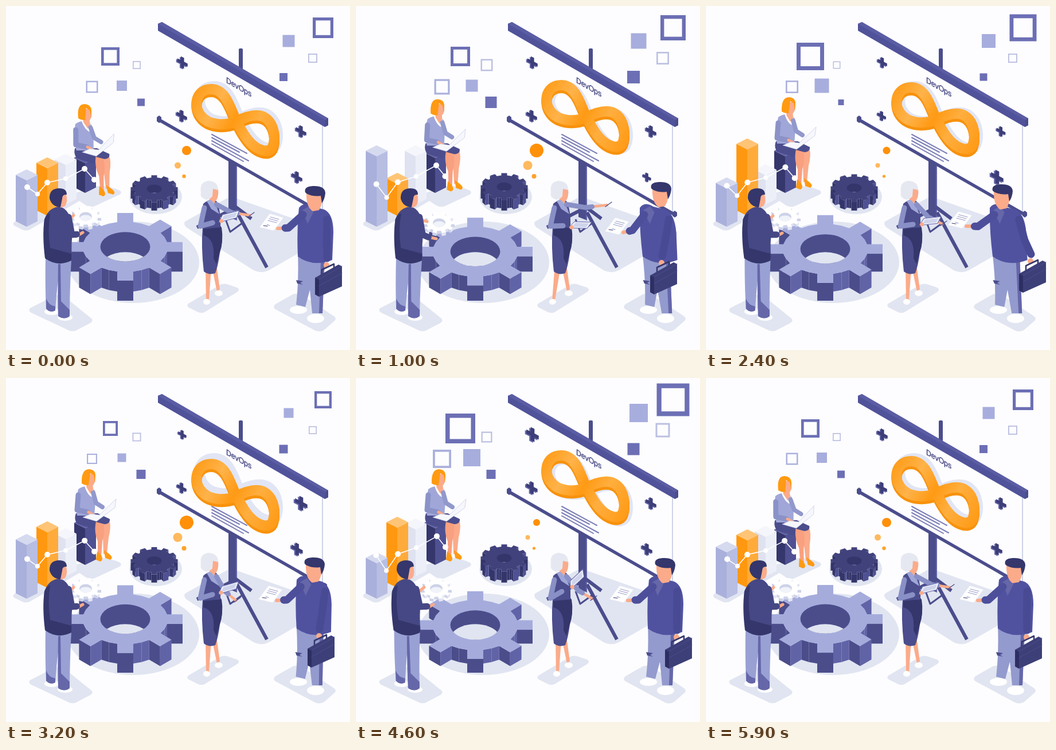
An HTML page for the animation above (6000 ms loop, 600x600 px).

```html
<!DOCTYPE html>
<html lang="en">
<head>
<meta charset="utf-8">
<title>DevOps team</title>
<style>
html, body { margin: 0; width: 100%; height: 100%; overflow: hidden; background: #fdfdff; }
svg { display: block; width: 100vw; height: 100vh; }
.d { fill: #4b4d8c; } .k { fill: #34366c; } .m { fill: #6567a9; } .l { fill: #a0a7d8; }
.g { fill: #e1e5f1; } .w { fill: #fff; } .s { fill: #fbab8a; } .o { fill: #ff9a12; }
.line { fill: none; stroke-linecap: round; stroke-linejoin: round; }
text { font: 14px "Liberation Sans", Arial, sans-serif; fill: #4a4b86; stroke: #4a4b86; stroke-width: .45px; }
</style>
</head>
<body>
<svg viewBox="0 0 600 600">
  <defs>
    <linearGradient id="ribbon" gradientUnits="userSpaceOnUse" x1="322" y1="150" x2="478" y2="240">
      <stop offset="0" stop-color="#ff9a14"/><stop offset=".28" stop-color="#ffb34a"/>
      <stop offset=".5" stop-color="#ff9a14"/><stop offset=".7" stop-color="#ffae3f"/>
      <stop offset="1" stop-color="#ff9b17"/>
    </linearGradient>
    <path id="loop" d="M402,201C392,182 385,145 358,145C332,145 326,172 339,190C352,208 380,210 402,201C420,192 441,185 455,197C468,208 471,231 465,246C458,259 438,251 425,237C414,225 409,214 402,201Z"/>
    <path id="plus" d="M-2.800,-9.500H2.800V-2.800H9V2.800H2.800V9.500H-2.800V2.800H-9V-2.800H-2.800Z"/>
  </defs>

  <g id="squares"></g>

  <!-- floor shadows -->
  <g class="g">
    <path d="M312,376Q309,382 316,387L432,461Q446,468 460,460L556,405Q564,398 556,390L400,335Q392,331 384,336Z"/>
    <ellipse cx="222" cy="447" rx="115" ry="71"/>
    <ellipse cx="261" cy="333" rx="46" ry="30"/>
    <path d="M14,377L30,368L110,330L150,316Q172,310 199,322Q203,326 198,329L155,349Q148,352 140,348L128,340L45,388Q36,394 28,390L14,383Q11,380 14,377Z"/>
    <path d="M42,527L85,505Q94,502 102,507L149,545Q153,549 147,553L124,565Q118,569 110,566L44,535Q38,531 42,527Z"/>
    <path d="M318,519L374,486Q381,483 388,486L403,491Q409,494 403,499L348,533Q342,537 335,534L319,526Q314,523 318,519Z"/>
    <path d="M470,520L500,503Q508,500 516,504L572,541Q578,545 572,550L556,564Q548,570 539,566L470,529Q464,525 470,520Z"/>
  </g>

  <!-- projection screen -->
  <path class="d" d="M388,266L403,275V374L388,368Z"/>
  <path class="m" d="M401,274L403,275V374L401,373Z"/>
  <g class="line" stroke="#4b4d8c" stroke-width="6" style="stroke-linecap:butt">
    <path d="M392,356L333,386M400,350L428,371M403,360L455,456"/>
    <path stroke-width="3" d="M383,372L391,394L413,378"/>
  </g>
  <path fill="#fdfdff" d="M268,43L552,209V362L268,195Z"/>
  <path class="line" stroke="#cdd2e8" stroke-width="2" d="M552,208V360"/>
  <path class="line" stroke="#4b4d8c" stroke-width="5.500" d="M266,198L556,364"/>
  <path class="d" d="M263,194L267,191L271,194V202L267,204L263,201ZM552,360L556,357L560,360V366L556,369L552,366Z"/>
  <rect class="d" x="406" y="74" width="7" height="42" rx="2"/>
  <path fill="#50529a" d="M265,31V43L556,211L562,208V196L272,28Z"/>
  <path fill="#5b5da4" d="M265,31L272,28L562,196L557,199Z"/>
  <path class="d" d="M557,199L562,196V208L556,211Z"/>
  <use href="#loop" class="line" stroke="#e1e5f4" stroke-width="20" transform="translate(5 -4)"/>
  <path class="line" stroke="#7c7eb7" stroke-width="2" d="M359,224L420,257M359,229.500L407,255M359,235L423,270M359,240.500L414,271"/>
  <text transform="matrix(.87 .5 0 1 384 133.500)">DevOps</text>
  <g id="ribbons" class="line">
    <use href="#loop" stroke="#f8920c" stroke-width="18" y="5"/>
    <use href="#loop" stroke="#f8920c" stroke-width="18" y="2.500"/>
    <use href="#loop" stroke="url(#ribbon)" stroke-width="18"/>
  </g>
  <g id="pluses"></g>
  <g id="dots"></g>

  <g id="bars"></g>

  <!-- seated woman -->
  <g id="seated">
    <path class="s" d="M166,244L180,248Q184,258 179,278L176,307L170,307L169,278L160,258Z"/>
    <path fill="#f9a080" d="M157,250L170,252Q173,270 168,285L166,313L160,313L160,285Q153,268 157,250Z"/>
    <path class="o" d="M159,302L166,309Q171,318 164,320L157,317ZM171,300L180,307Q188,313 182,317L173,314Z"/>
    <path class="d" d="M122,236L160,236L181,246Q182,254 172,255L157,251L153,263L124,254Q118,246 122,236Z"/>
    <path class="l" d="M126,194Q138,185 152,192Q158,200 156,215L154,240L124,240Q120,218 126,194Z"/>
    <path class="w" d="M137,188L153,190L151,208Q142,205 137,188Z"/>
    <path class="s" d="M142,180H151L152,195L147,202L140,190Z"/>
    <path class="line" stroke="#9198cc" stroke-width="8" d="M152,200L157,218L168,225"/>
    <path class="line" stroke="#8b92c8" stroke-width="9" d="M126,204L124,230L143,234"/>
    <path class="line" stroke="#fbab8a" stroke-width="5" d="M144,234L154,240"/>
    <path class="s" d="M143,168L154,167Q158,180 152,187L144,185Z"/>
    <path class="o" d="M132,184Q131,159 145,159Q157,160 156,172L155,183L153,170L147,166L144,187Q138,188 132,184Z"/>
    <path fill="#f6f7fc" stroke="#c3c8e4" stroke-width=".7" d="M134,243L148,237L163,239L192,211L190,226L158,250Z"/>
  </g>

  <path id="trend" class="line" stroke="#fff" stroke-width="1.600"/>
  <g id="knots" fill="#fff"></g>
  <g id="smallGear"></g>
  <g id="bigGear"></g>

  <!-- presenter -->
  <g id="rearLeg">
    <path class="s" d="M348,455L358,458L354,512L349,515Z"/>
    <ellipse class="w" cx="350" cy="516" rx="6" ry="5"/>
  </g>
  <path class="s" d="M359,455L368,458L373,494L368,498Z"/>
  <ellipse class="w" cx="371" cy="501" rx="7" ry="5"/>
  <path class="d" d="M343,386L375,384Q380,410 373,430Q370,453 365,466Q354,470 345,463Q340,420 343,386Z"/>
  <path class="k" d="M344,388L376,386Q380,410 372,432L367,450L362,440Q365,405 344,400Z"/>
  <path class="d" d="M344,345Q355,335 367,340Q375,355 374,386L343,389Q340,365 344,345Z"/>
  <path class="s" d="M354,335H363L366,350L360,349Z"/>
  <path class="l" d="M350,340L357,337L368,352L372,363L358,354Z"/>
  <path id="tabletArm" class="line" stroke="#8990c6" stroke-width="9"/>
  <path id="pointer" class="line" stroke="#fbab8a" stroke-width="4.500"/>
  <path id="pointerSleeve" class="line" stroke="#8990c6" stroke-width="8.500"/>
  <path id="pen" class="line" stroke="#4b4d8c" stroke-width="1.300"/>
  <g id="tablet">
    <path fill="#eef0f9" stroke="#6567a9" stroke-width="1" d="M-20,5L-10,-6L20,-5L12,6Z"/>
    <path fill="#cfd4ec" d="M-14,3L-8,-4L15,-3L10,4Z"/>
    <circle class="s" cx="-15" cy="4" r="3.500"/>
  </g>
  <path class="s" d="M355,316L370,319Q372,335 364,342L356,338Z"/>
  <path fill="#e6e8f1" d="M340,325Q337,306 354,305Q370,306 370,321L361,319L360,332Q352,341 345,336Q338,333 340,325Z"/>

  <!-- man with briefcase -->
  <ellipse class="w" cx="510" cy="530" rx="15" ry="7"/><ellipse class="w" cx="540" cy="545" rx="15" ry="8"/>
  <g id="guest">
    <path fill="#939acd" d="M509,430L556,440L552,536L534,536L530,495L522,525L506,521Q511,480 509,430Z"/>
    <path class="m" d="M549,445L556,440L552,536L546,536Z"/>
    <path class="d" d="M506,478L518,480L513,483L518,486L508,484Z"/>
    <path fill="#5052a0" d="M511,352Q520,340 535,350L555,355Q571,362 571,395L569,443Q535,456 509,437Q507,390 511,352Z"/>
    <path class="m" d="M517,356L529,349L536,360L526,380Z"/>
  </g>
  <path id="caseArm" class="line" stroke="#484a94" stroke-width="13"/>
  <g id="guestHead">
    <path class="s" d="M524,326L551,330Q553,345 546,356L535,358Q523,350 524,326Z"/>
    <path class="k" d="M522,325Q519,315 535,314Q556,313 557,326Q556,337 551,344L549,331Q535,333 524,327Z"/>
  </g>
  <circle id="caseHand" class="s" r="5"/>
  <g id="briefcase">
    <path class="line" stroke="#34366c" stroke-width="2.500" d="M-12,-10V-18L9,-28V-20"/>
    <path fill="#3d3f78" d="M-24,-4L17,-27L23,-24V11L-17,29L-24,25Z"/>
    <path fill="#2d2f62" d="M-24,-4L-17,-1V29L-24,25Z"/>
    <path class="line" stroke="#4b4d92" d="M-17,-1L23,-24M-17,10L23,-12"/>
  </g>
  <g id="paper">
    <path class="w" stroke="#dfe3f1" stroke-width=".6" d="M-21,8L-3,-16L21,-9L4,14Z"/>
    <path class="line" stroke="#9a9dc8" stroke-width="1.200" d="M-2,-10L13,-6M-4,-7L11,-3M-6,-4L9,0M-8,3L-3,5"/>
    <path class="line" stroke="#34366c" d="M-14,5L-7,6"/>
  </g>
  <path id="giveHand" class="line" stroke="#fbab8a" stroke-width="6"/>
  <path id="giveArm" class="line" stroke="#4d4f9a" stroke-width="13"/>

  <!-- man with gear -->
  <g id="toyGear"></g>
  <path id="toyHands" class="line" stroke="#fbab8a" stroke-width="5"/>
  <g id="maker">
    <ellipse class="w" cx="80" cy="533" rx="13" ry="6"/><ellipse class="w" cx="103" cy="543" rx="13" ry="6"/>
    <path fill="#99a1d4" d="M69,438L114,442Q111,500 111,541Q102,548 91,541Q90,500 92,470Q88,500 86,531Q77,536 70,528Q68,490 69,438Z"/>
    <path class="m" d="M91,450L95,450L96,515L111,530V541Q102,548 91,541Q90,500 91,450Z"/>
    <path class="m" d="M70,510Q74,522 86,524L86,531Q77,536 70,528Z"/>
    <path fill="#464885" d="M67,372Q74,352 92,350Q108,352 113,374L117,387Q113,415 115,440Q90,456 69,438Q64,400 67,372Z"/>
    <path class="k" d="M67,372Q72,362 77,362Q72,390 77,422L114,432V444Q90,456 68,440Q63,400 67,372Z"/>
    <path class="s" d="M92,326L104,326Q109,340 103,349L95,352Z"/>
    <path class="k" d="M76,336Q75,318 93,318Q106,318 106,329Q98,328 98,336L95,351Q80,350 76,336Z"/>
  </g>
  <path id="makerArm" class="line" stroke="#464885" stroke-width="11"/>
</svg>
<script>
const $ = id => document.getElementById(id);
const NS = 'http://www.w3.org/2000/svg';
const HALF = [0, 200, 1000, 1600, 1800, 2400, 2900];
const FULL = [0, 1000, 1800, 2400, 3200, 4600, 5900];

// periodic monotone cubic through the given values
function track(period, times, list) {
  const vals = [...list, list[0]], n = times.length;
  const at = i => {
    const k = Math.floor(i / n);
    return [times[i - k * n] + k * period, vals[i - k * n]];
  };
  const slope = i => (at(i + 1)[1] - at(i)[1]) / (at(i + 1)[0] - at(i)[0]);
  const tangent = i => {
    const a = slope(i - 1), b = slope(i);
    return a * b <= 0 ? 0 : 2 * a * b / (a + b);
  };
  return time => {
    const t = time % period;
    let i = n - 1;
    while (times[i] > t) i--;
    const [t0, a] = at(i), [t1, b] = at(i + 1), d = t1 - t0, u = (t - t0) / d, v = 1 - u;
    return v * v * (1 + 2 * u) * a + u * u * (3 - 2 * u) * b
      + d * u * v * (v * tangent(i) - u * tangent(i + 1));
  };
}
const half = (...v) => track(3000, HALF, v);
const full = (...v) => track(6000, FULL, v);

const mix = (a, b, k) => a.map((v, i) => v + (b[i] - v) * k);
const add = (a, x, y) => [a[0] + x, a[1] + y];
const line = (...pts) => 'M' + pts.map(p => p.map(v => v.toFixed(1))).join('L');
const set = (el, attrs) => { for (const k in attrs) el.setAttribute(k, attrs[k]); };
const make = (parent, tag, attrs) => {
  const el = document.createElementNS(NS, tag);
  set(el, attrs);
  return parent.appendChild(el);
};
const poly = (fill, ...pts) => `<path fill="${fill}" d="${line(...pts)}Z"/>`;
const place = (id, p, more = '') => set($(id), { transform: `translate(${p}) ${more}` });
const lean = (id, k, y, dy = 0) => set($(id), { transform: `matrix(1 0 ${-k} 1 ${k * y} ${dy})` });

// x, y, colour, border ratio (0 = solid), size
const squares = [
  [553, 38, '#6c6fb4', .145, half(36, 30, 44, 57, 57, 47)],
  [493, 61, '#a7addd', 0, half(21, 17, 27, 32, 32, 24)],
  [535, 91, '#bcc0e1', .12, half(16, 14, 22, 25, 25, 16)],
  [484, 124, '#6c6fb4', 0, half(14, 15, 22, 21, 21, 13)],
  [182, 88, '#6c6fb4', .145, half(32, 26, 34, 52, 51, 48)],
  [228, 103, '#bcc0e1', .12, half(14, 15, 21, 19, 21, 13)],
  [150, 141, '#abb1dd', .12, half(21, 18, 27, 32, 34, 22)],
  [202, 139, '#a7addd', 0, half(18, 15, 21, 30, 30, 25)],
  [235.5, 168, '#6c6fb4', 0, half(13, 16, 20, 16, 17, 10)]
].map(s => [make($('squares'), 'rect', { fill: s[3] ? 'none' : s[2], stroke: s[3] ? s[2] : 'none' }), ...s]);

const dots = [
  [315, 252, '#ff9008', half(8, 12, 12, 6, 7, 6.5)],
  [299.5, 278, '#ffb95f', half(5.5, 8, 8, 4, 6, 4)],
  [310.5, 297, '#ffa22b', half(3.2, 4, 4, 2.6, 4.2, 2.6)]
].map(([cx, cy, fill, r]) => [make($('dots'), 'circle', { cx, cy, fill }), r]);

const pluses = [
  [307, 99, full(1, 1, .95, .9, .78, 1.2)],
  [306, 192, full(1, 1, 1, .82, .9, 1.08)],
  [514, 219, full(1, 1, .8, .85, 1.2, 1)],
  [507, 299, full(1, .78, .95, 1.2, 1.08, 1)]
].map(([x, y, size]) => {
  const g = make($('pluses'), 'g', {});
  make(g, 'use', { href: '#plus', fill: '#6365a8', transform: 'translate(-1.2 .7) skewY(27)' });
  make(g, 'use', { href: '#plus', fill: '#3d3e78', transform: 'translate(.8 -.4) skewY(27)' });
  return [g, x, y, size];
});

const bars = [
  [138, 326, ['#35366c', '#4f5193', '#5d5fa4'], full(255, 246, 243, 243, 243, 243)],
  [104, 346, ['#dfe2f1', '#edeff8', '#f5f6fb'], full(258, 243, 254, 276, 262, 245)],
  [72, 366, ['#ff9810', '#ffab3b', '#ffc475'], full(264, 291, 252, 231, 250, 242)],
  [36, 385, ['#a9b0db', '#b8bee2', '#d6daef'], full(285, 243, 268, 299, 272, 304)]
];
const knotsLow = [[37, 316], [55, 328], [72, 308], [104, 301], [137, 284], [154, 303]];
const knotsHigh = [[35, 309], [53, 336], [73, 307], [105, 296], [141, 276], [156, 295]];
const knots = knotsLow.map((p, i) => make($('knots'), 'circle', { r: i === 3 || i === 1 ? 4 : 5 }));

function bar([x, base, [left, right, top], height], t) {
  const y = height(t), a = x - 19, b = x + 19;
  return poly(left, [a, y + 9.5], [x, y + 19], [x, base], [a, base - 9.5])
    + poly(right, [b, y + 9.5], [x, y + 19], [x, base], [b, base - 9.5])
    + poly(top, [x, y], [b, y + 9.5], [x, y + 19], [a, y + 9.5]);
}

// extruded isometric gear: top face centre, depth h, outer and root radius, half tooth width
function gear({ R, r, w, n, k, hole, top, light, dark, floor }, [cx, cy], h) {
  const pts = [];
  const push = (x, y) => pts.push([cx + x, cy + k * y]);
  for (let i = 0; i < n; i++) {
    const a = 2 * Math.PI * i / n, c = Math.cos(a), s = Math.sin(a), m = a + Math.PI / n, q = Math.hypot(r, w);
    for (const [d, e] of [[r, -w], [R, -w], [R, w], [r, w]]) push(d * c - e * s, d * s + e * c);
    push(q * Math.cos(m), q * Math.sin(m));
  }
  const walls = pts.map((p, i) => [p, pts[(i + 1) % pts.length]])
    .filter(([p, q]) => q[0] < p[0] - .01)
    .sort((a, b) => a[0][1] + a[1][1] - b[0][1] - b[1][1])
    .map(([p, q]) => poly(q[1] - p[1] > 1 ? light : dark, p, q, add(q, 0, h), add(p, 0, h)));
  const ry = hole * k, d = Math.min(h, ry * 1.9);
  const y = cy + d / 2, x = hole * Math.sqrt(1 - (d / 2 / ry) ** 2);
  return walls.join('') + poly(top, ...pts)
    + `<ellipse cx="${cx}" cy="${cy}" rx="${hole}" ry="${ry}" fill="${dark}"/>`
    + `<path fill="${floor}" d="M${cx - x},${y}A${hole} ${ry} 0 0 1 ${cx + x},${y}A${hole} ${ry} 0 0 1 ${cx - x},${y}"/>`;
}
const big = { R: 100, r: 73, w: 14, n: 8, k: .59, hole: 43.5, top: '#a5acdc', light: '#6163a7', dark: '#4b4d8b', floor: '#e1e5f1' };
const small = { R: 41, r: 34, w: 5, n: 12, k: .58, hole: 13, top: '#41427c', light: '#4f5193', dark: '#34356a', floor: '#8f93c2' };
const toy = { R: 27, r: 21, w: 3.6, n: 10, k: .68, hole: 11, top: '#fff', light: '#e3e6f2', dark: '#cdd2e8', floor: '#f1f3fa' };

const ribbonY = half(0, 5, -7, -10, -9, -3);
const sink = full(1, .3, 0, 0, 0, 0);
const makerLean = half(0, 0, 2, -5, -6, -3);
const toyX = full(139, 145, 135, 138, 139, 140), toyY = full(367, 378, 365, 368, 367, 367);
const legX = full(0, -7, -7, 0, 0, 0);
const penX = full(425, 438, 438, 412, 401, 412), penY = full(365, 347, 347, 380, 388, 385);
const tabX = full(389, 391, 391, 391, 388, 385), tabY = full(367, 382, 382, 375, 366, 351);
const tabTurn = full(-16, 0, 0, -8, -18, -45);
const chestX = full(0, -12, -5, -12, -3, 0);
const headX = full(0, -7, -16, -22, -1, 0), headY = full(0, -7, -2, -3, -1, 0);
const giveX = full(474, 466, 463, 454, 472, 474), giveY = full(388, 395, 394, 384, 388, 388);
const caseX = full(563, 537, 572, 570, 550, 563), caseY = full(478, 474, 470, 471, 476, 478);

function draw(t) {
  const wave = (1 - Math.cos(2 * Math.PI * t / 3000)) / 2;

  for (const [el, x, y, , border, size] of squares) {
    const s = size(t), b = s * border, side = s - b;
    set(el, { x: x - side / 2, y: y - side / 2, width: side, height: side, 'stroke-width': b });
  }
  for (const [el, r] of dots) set(el, { r: r(t) });
  for (const [el, x, y, size] of pluses) set(el, { transform: `translate(${x} ${y}) scale(${size(t)})` });
  place('ribbons', [0, ribbonY(t)]);

  $('bars').innerHTML = bars.map(b => bar(b, t)).join('');
  const path = knotsLow.map((p, i) => mix(p, knotsHigh[i], wave));
  set($('trend'), { d: line(...path) });
  path.forEach(([cx, cy], i) => set(knots[i], { cx, cy }));

  const q = sink(t);
  lean('seated', -.082 * q, 256, 12 * q);

  $('bigGear').innerHTML = gear(big, [208, 420 + 11 * wave], 35 - 11 * wave);
  $('smallGear').innerHTML = gear(small, [258.5, 319 - 5 * wave], 14 + 5 * wave);

  lean('rearLeg', -legX(t) / 75, 440);
  const hand = [penX(t), penY(t)], shoulder = [367, 346];
  const elbow = add(mix(shoulder, hand, .5), -2, 5);
  set($('pointer'), { d: line(elbow, hand) });
  set($('pointerSleeve'), { d: line(shoulder, elbow, mix(elbow, hand, .3)) });
  set($('pen'), { d: line(add(hand, -3, 3), add(hand, 8, -5)) });
  const tab = [tabX(t), tabY(t)];
  place('tablet', tab, `rotate(${tabTurn(t)})`);
  set($('tabletArm'), { d: line([346, 352], [339, 384], mix([345, 384], tab, .35)) });

  const sway = chestX(t) / 145;
  const shift = (x, y) => [x + sway * (545 - y), y];
  lean('guest', sway, 545);
  place('guestHead', [headX(t), headY(t)]);
  const give = [giveX(t), giveY(t)], front = shift(518, 364);
  const bend = add(mix(front, give, .62), 2, 8);
  set($('giveHand'), { d: line(bend, give) });
  set($('giveArm'), { d: line(front, bend, mix(bend, give, .3)) });
  place('paper', add(give, -11, -10));
  const bag = [caseX(t), caseY(t)], grip = add(bag, -4, -26), back = shift(560, 372);
  set($('caseArm'), { d: line(back, mix(back, grip, .5), add(grip, 1, -12)) });
  set($('caseHand'), { cx: grip[0], cy: grip[1] });
  place('briefcase', bag);

  const held = [toyX(t), toyY(t)], tilt = makerLean(t) / 212;
  lean('maker', tilt, 545);
  $('toyGear').innerHTML = gear(toy, held, 5);
  const palm = add(held, -5, 28), arm = [109 + tilt * 177, 368];
  set($('toyHands'), { d: line([122, 402], palm) + line([110, 372], add(held, -21, -2)) });
  set($('makerArm'), { d: line(arm, [115 + tilt * 145, 399], mix([115, 401], palm, .45)) });
}

let last = -1;
function tick(now) {
  const step = Math.floor(now / 100) % 60;
  if (step !== last) draw((last = step) * 100);
  requestAnimationFrame(tick);
}
draw(0);
requestAnimationFrame(tick);
</script>
</body>
</html>
```
